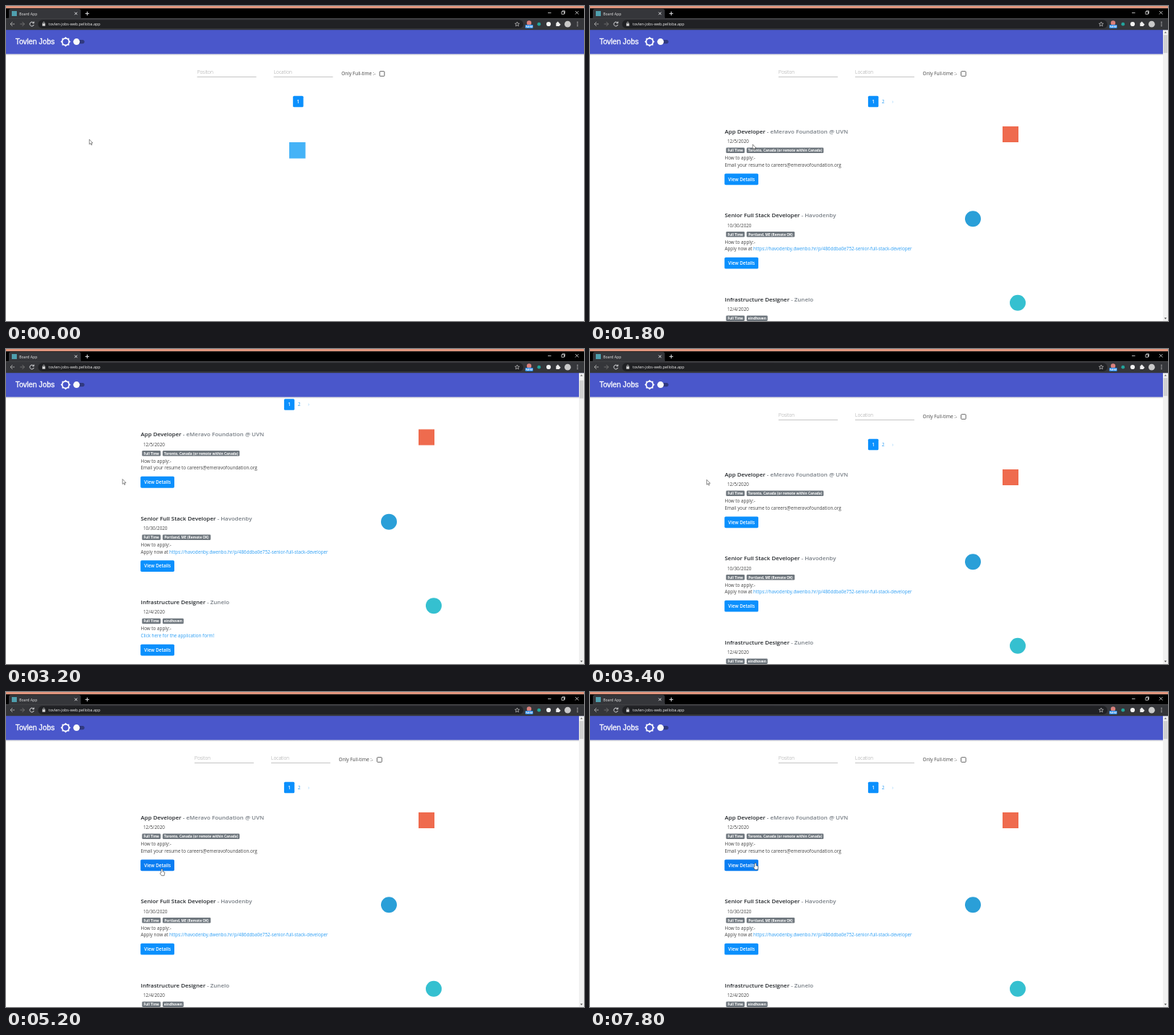
An HTML page that plays this animation: 800 px wide and 437 px high, repeating every 8 s.

```html
<!DOCTYPE html>
<html lang="en">
<head>
<meta charset="utf-8">
<title>Jobs</title>
<style>
html, body { margin: 0; width: 100%; height: 100%; overflow: hidden; background: #fff; }
svg { display: block; width: 800px; height: 437px; }
text { font-family: "Open Sans", "Noto Sans", sans-serif; font-size: 6.3px; fill: #444; }
.title { font-size: 7.95px; font-weight: 600; fill: #24282c; }
.muted { fill: #777e85; }
.link { fill: #2a9df4; }
.badge { font-size: 4.75px; font-weight: 700; fill: #fff; text-anchor: middle; }
.btn { font-size: 6.3px; font-weight: 600; fill: #fff; text-anchor: middle; }
.hint { font-size: 6.55px; font-weight: 300; fill: #999; }
.brand { font: 500 10.3px "Liberation Sans", Arial, sans-serif; fill: #fff; stroke: #fff; stroke-width: .3; }
.line { fill: none; stroke: #dcdde0; stroke-width: 1; }
</style>
</head>
<body>
<svg id="stage" viewBox="0 0 800 437" xmlns="http://www.w3.org/2000/svg"></svg>
<script>
const LOOP = 8000, STEP = 200, LOADED = 1200, PAGED = 600;
const BLUE = '#0b90fd', HOVER = '#0a7df2', NAVY = '#4a57cb';

const rect = (x, y, w, h, fill, more = '') =>
  `<rect x="${x}" y="${y}" width="${w}" height="${h}" fill="${fill}" ${more}/>`;
const dot = (x, y, r, fill) => `<circle cx="${x}" cy="${y}" r="${r}" fill="${fill}"/>`;
const text = (x, y, s, cls = '', more = '') => `<text x="${x}" y="${y}" class="${cls}" ${more}>${s}</text>`;
const path = (d, more = 'class="line"') => `<path d="${d}" ${more}/>`;
const link = s => `<tspan class="link">${s}</tspan>`;

const jobs = [
  { y: 174, role: 'App Developer', firm: 'eMeravo Foundation @ UVN', date: '12/5/2020',
    place: 'Toronto, Canada (or remote within Canada)', placeW: 106.5,
    lines: ['Email your resume to careers@emeravofoundation.org'],
    logo: rect(571, 167, 22, 22, '#ef6b4e') },
  { y: 290.4, role: 'Senior Full Stack Developer', firm: 'Havodenby', date: '10/30/2020',
    place: 'Portland, ME (Remote OK)', placeW: 66.5,
    lines: ['Apply now at ' + link('https://havodenby.dwenbo.hr/p/486ddba0e752-senior-full-stack-developer')],
    logo: dot(530, 295.2, 11, '#2a9fd8') },
  { y: 406.8, role: 'Infrastructure Designer', firm: 'Zunelo', date: '12/4/2020',
    place: 'eindhoven', placeW: 29,
    lines: [link('Click here for the application form!')],
    logo: dot(592, 411.7, 11, '#35c0d0') },
  { y: 523.2, role: '(Senior) Frontend Developer (f/m/d)', firm: 'PILTEROO GmbH', date: '12/4/2020',
    place: 'Frankfurt, Germany (remote within Germany)', placeW: 111.5,
    lines: ['YOUR CONTACT AT PILTEROO', 'Ute | Senior Talent Acquisition Expert | career@pilteroo.com'],
    logo: rect(562, 518.5, 20, 20, '#3a3a3a') }
];

function badge(x, y, w, s) {
  return rect(x, y - 3.8, w, 7.5, '#6f777e', 'rx="1.3"') + text(x + w / 2, y + 1.7, s, 'badge');
}

function jobCard(j, i) {
  const top = j.y + 58.4 + (j.lines.length - 1) * 17;
  return text(186.5, j.y + 3, `${j.role} <tspan class="muted">- ${j.firm}</tspan>`, 'title')
    + text(190, j.y + 16.2, j.date)
    + badge(188.3, j.y + 26.4, 25.7, 'Full Time')
    + badge(216.8, j.y + 26.4, j.placeW, j.place)
    + text(186.5, j.y + 39.1, 'How to apply:-')
    + j.lines.map((s, k) => text(186.5, j.y + 49 + k * 16.6, s)).join('')
    + rect(186.2, top, 46.8, 15.8, BLUE, `rx="1.7" id="btn${i}"`)
    + text(209.7, top + 10.1, 'View Details', 'btn')
    + j.logo;
}

function filters() {
  return text(264.7, 94.2, 'Positon', 'hint') + rect(264.5, 97.9, 82, .7, '#aaa')
    + text(370.7, 94.2, 'Location', 'hint') + rect(370.5, 97.9, 82, .7, '#aaa')
    + text(464.2, 95.6, 'Only Full-time :-', '', 'style="font-size:6.5px"')
    + rect(517.2, 90.7, 6.6, 6.6, 'none', 'rx=".8" stroke="#555" stroke-width=".9"');
}

function pager() {
  return `<g id="pager">${rect(388.5, 124.7, 14.4, 15.6, BLUE, 'rx="1.6"')}${text(395.7, 135, '1', 'btn')}
    <g id="more">${text(407.5, 135, '2', 'link')}${text(421.6, 134.6, '›', 'link', 'opacity=".6"')}</g></g>`;
}

function appBar() {
  const side = a => rect(-4.9, -4.9, 9.8, 9.8, '#fff', `transform="translate(82.5 49.6) rotate(${a})"`);
  return rect(0, 66.5, 800, 2.5, 'url(#shade)') + rect(0, 33, 800, 33.6, NAVY)
    + text(13, 53.2, 'Tovlen Jobs', 'brand')
    + side(0) + side(45) + dot(82.5, 49.6, 3.9, NAVY)
    + rect(96, 46.9, 12.6, 5.4, '#30397f', 'rx="2.7"') + dot(97.6, 49.6, 4.5, '#fafafa');
}

function browser() {
  const arrow = (x, d, c) => path(`M${x - 3 * d} 25H${x + 3 * d}M${x} 22l${3 * d} 3l${-3 * d} 3`,
    `fill="none" stroke="${c}" stroke-width=".9"`);
  return rect(0, 0, 800, 3.5, '#e3977f') + rect(0, 3.2, 800, 14.3, '#000')
    + path('M2 17.5Q4 17.5 4 15V6.5Q4 4 6.5 4H101Q103.5 4 103.5 6.5V15Q103.5 17.5 105.5 17.5Z', 'fill="#35363a"')
    + rect(0, 17.3, 800, 15.9, '#35363a') + rect(44.5, 19.3, 671.5, 11.8, '#202124', 'rx="5.9"')
    + rect(8, 7, 7, 7, '#4f9fae')
    + text(18.2, 12.5, 'Board App', '', 'style="font-size:5.1px;fill:#e6e6e6"')
    + path('M95 8.6l3.6 3.6m0-3.6l-3.6 3.6M109.7 10.4h5.4M112.4 7.7v5.4')
    + path('M750 9.5h4.5M769 7.8h3.5v3.5h-3.5zM770 7.8v-1h3.5v3.5h-1M788 7l4.5 4.5m0-4.5l-4.5 4.5',
      'fill="none" stroke="#ddd" stroke-width=".8"')
    + arrow(9, -1, '#aaa') + arrow(22.5, 1, '#777')
    + path('M38.3 23.5A2.9 2.9 0 1 0 38.6 26M38.7 21.6v2.2h-2.2')
    + rect(50.3, 24.2, 4, 3.5, '#d5d5d5')
    + path('M51.2 24.5v-1.2a1.1 1.1 0 0 1 2.2 0v1.2', 'fill="none" stroke="#d5d5d5" stroke-width=".7"')
    + text(59, 27.1, 'tovlen-jobs-web.pelloba.app', '', 'style="font-size:5.45px;fill:#f0f0f0"')
    + path('M707.5 22.1l.9 2 2.1.2-1.6 1.4.5 2.2-1.9-1.2-1.9 1.2.5-2.2-1.6-1.4 2.1-.2z',
      'fill="none" stroke="#ccc" stroke-width=".7"')
    + dot(724, 23.5, 3.2, '#d9817c') + rect(718.7, 26, 10.8, 5, '#2185e8', 'rx=".8"')
    + text(724.1, 30.1, 'NEW', 'badge', 'style="font-size:4.2px"')
    + dot(737.7, 25.2, 2.4, '#23a39b') + dot(751, 25, 3.1, '#f3f3f3')
    + rect(761.3, 23.3, 4.8, 4.8, '#eee', 'rx=".6"') + dot(763.7, 23, 1.2, '#eee') + dot(766.2, 25.7, 1.2, '#eee')
    + dot(777.4, 25.2, 4.4, '#c9c9c9')
    + [22.5, 25, 27.5].map(y => dot(791, y, .7, '#ddd')).join('');
}

function scrollbar() {
  return rect(793, 33.2, 7, 404, '#f1f1f1') + rect(793.7, 40.2, 5.6, 25, '#d0d0d0', 'id="thumb"')
    + path('M794.8 37.5l1.7-2 1.7 2z', 'fill="#666"') + path('M794.8 432.5l1.7 2 1.7-2z', 'fill="#444"');
}

const stage = document.getElementById('stage');
stage.innerHTML = `<defs><linearGradient id="shade" x2="0" y2="1">
  <stop stop-color="#000" stop-opacity=".18"/><stop offset="1" stop-color="#000" stop-opacity="0"/></linearGradient></defs>
  ${rect(0, 0, 800, 437, '#fff')}
  <g id="page"><g id="filters">${filters()}</g>${pager()}
  ${rect(392, 189, 22.5, 22.5, '#45b3f7', 'id="loader"')}
  <g id="list">${jobs.map(jobCard).join('')}</g></g>
  ${appBar()}<g id="bar">${scrollbar()}</g>${browser()}
  <g id="arrow">${path('M0 0V6.9L1.6 5.4 2.7 7.9 3.8 7.4 2.7 5H4.8Z', 'fill="#fff" stroke="#444" stroke-width=".6"')}</g>
  <g id="hand">${path('M-1.1 5.4V1Q-1.1 0 0 0T1.1 1V3.6L3.2 4.1Q4 4.4 3.9 5.3L3.2 9.2H-.6L-2.6 6.3Q-2.3 4.9-1.1 5.4Z',
    'fill="#fff" stroke="#333" stroke-width=".6"')}</g>`;
const el = id => document.getElementById(id);

// Keys are [time, value, value...], linear in between.
const pointer = [[0, 115.3, 185], [1600, 115.3, 185], [1800, 225.2, 192], [2200, 176, 183], [2800, 160.5, 179],
  [3400, 161.6, 181.3], [4000, 379, 141.5], [4800, 238, 230], [5200, 215.8, 245.5],
  [6800, 215.8, 245.5], [7800, 229, 237.3]];
const scrollKeys = [[1800, 0], [2800, 166.7], [3400, 0]];

function at(keys, t) {
  if (t <= keys[0][0]) return keys[0].slice(1);
  const i = keys.findIndex(k => k[0] > t);
  if (i < 0) return keys[keys.length - 1].slice(1);
  const a = keys[i - 1], b = keys[i], p = (t - a[0]) / (b[0] - a[0]);
  return a.slice(1).map((v, n) => v + (b[n + 1] - v) * p);
}

const show = (id, on) => el(id).setAttribute('display', on ? 'inline' : 'none');
const move = (id, x, y) => el(id).setAttribute('transform', `translate(${x} ${y})`);

function draw(t) {
  const loaded = t >= LOADED, shift = loaded ? -3.6 : 0;
  const [scroll] = at(scrollKeys, t), [x, y] = at(pointer, t);

  move('page', 0, -scroll);
  move('thumb', 0, scroll * .06);
  move('filters', shift, 0);
  move('pager', t < PAGED ? 8.7 : shift, 0);
  show('more', t >= PAGED);
  show('list', loaded);
  show('bar', loaded);
  show('loader', !loaded);
  const size = 22.5 + 13 * Math.min(t / 1000, 1);
  el('loader').setAttribute('width', size);
  el('loader').setAttribute('height', size);

  const over = loaded && x > 186.5 && x < 233 && y + scroll > 232.5 && y + scroll < 248;
  el('btn0').setAttribute('fill', over ? HOVER : BLUE);
  show('arrow', !over);
  show('hand', over);
  move(over ? 'hand' : 'arrow', x, y);
}

const start = performance.now();
function tick() {
  const t = (performance.now() - start) % LOOP;
  draw(Math.floor(t / STEP) * STEP);
  requestAnimationFrame(tick);
}
tick();
</script>
</body>
</html>
```
